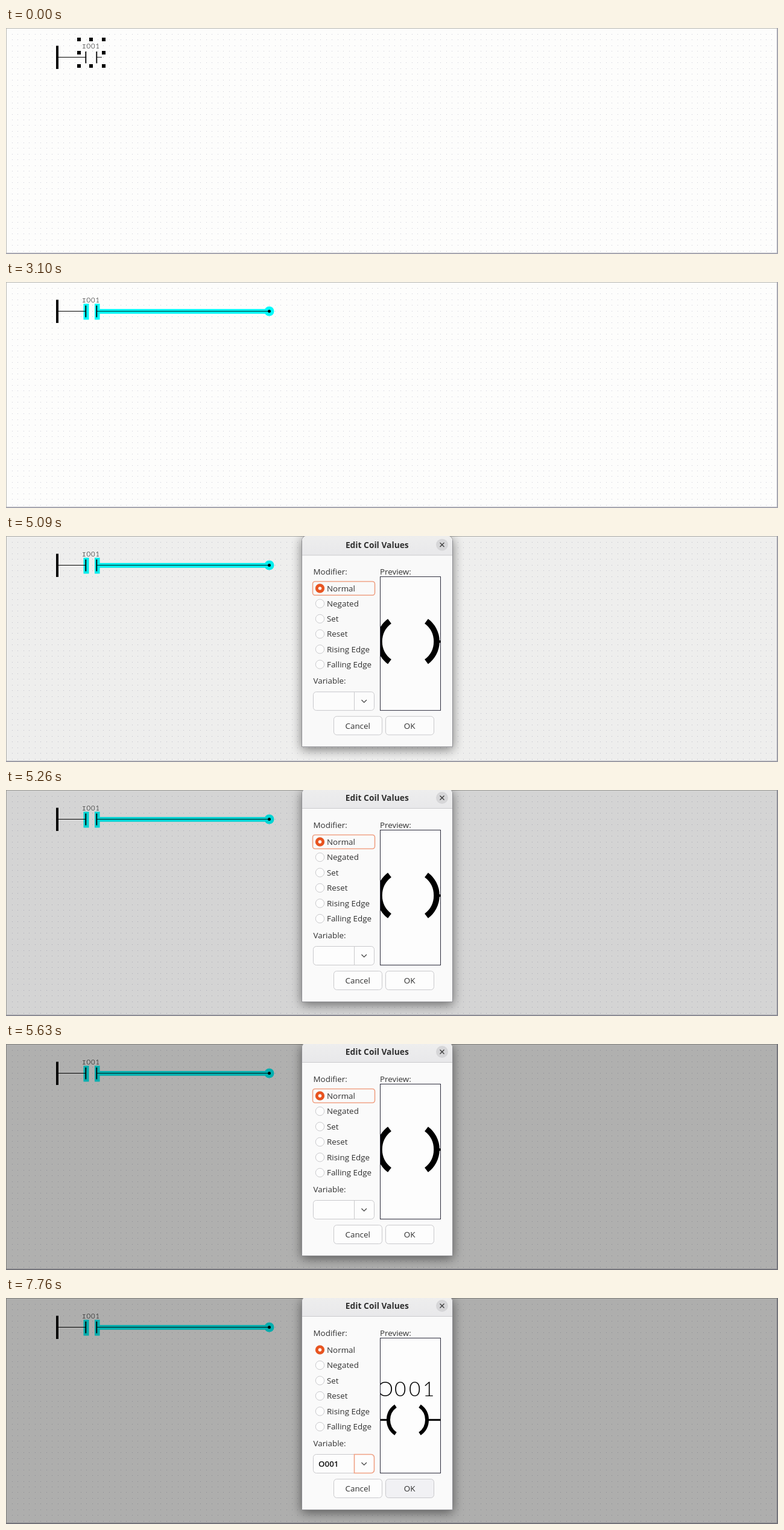
Recreate the animation shown at these times as an HTML page with a canvas. Size 1280x375 px, loop 8 s.

```html
<!DOCTYPE html>
<html lang="en">
<head>
<meta charset="utf-8">
<title>Ladder editor</title>
<style>
  html, body { margin: 0; width: 100%; height: 100%; overflow: hidden; background: #fdfdfc; }
  canvas, svg { position: absolute; left: 0; top: 0; width: 1280px; height: 375px; display: block; }
  text { font: 500 13.4px "Open Sans", "Noto Sans", sans-serif; fill: #303030; white-space: pre; }
  .title { font-size: 13.8px; font-weight: 700; }
  .mid { text-anchor: middle; }
  .thin { font-family: Lato, "Open Sans", sans-serif; font-weight: 300; fill: #000; }
  .mono { font-family: "Liberation Mono", monospace; fill: #666; }
  .value { font-weight: 600; fill: #111; }
  .box { fill: #fdfdfd; stroke: #c9c9cc; }
  .ring { fill: none; stroke: #f0a184; stroke-width: 1.6; }
  .ink { fill: none; stroke: #000; }
</style>
</head>
<body>
<canvas id="grid" width="1280" height="375"></canvas>
<svg id="stage" viewBox="0 0 1280 375">
  <defs>
    <linearGradient id="bar" x1="0" y1="0" x2="0" y2="1">
      <stop offset="0" stop-color="#eeeeee"/><stop offset="1" stop-color="#e8e8ea"/>
    </linearGradient>
    <filter id="shade" x="-20%" y="-20%" width="140%" height="140%">
      <feDropShadow dx="0" dy="4" stdDeviation="9" flood-opacity=".5"/>
    </filter>
    <filter id="soft" x="-10%" y="-10%" width="120%" height="120%">
      <feDropShadow dx="0" dy="1" stdDeviation="1.2" flood-opacity=".22"/>
    </filter>
    <clipPath id="pane"><rect x="621" y="67" width="99.5" height="223"/></clipPath>
  </defs>
</svg>
<script>
const LOOP = 8000, PITCH = 9.47, Y = 48.5;
const stage = document.getElementById('stage');

function add(parent, tag, attrs, text) {
  const el = document.createElementNS('http://www.w3.org/2000/svg', tag);
  for (const k in attrs) el.setAttribute(k, attrs[k]);
  if (text) el.textContent = text;
  parent.appendChild(el);
  return el;
}
const group = (p, attrs) => add(p, 'g', attrs || {});
const rect = (p, x, y, width, height, attrs) => add(p, 'rect', { x, y, width, height, ...attrs });
const path = (p, d, attrs) => add(p, 'path', { d, ...attrs });
const label = (p, x, y, text, cls) => add(p, 'text', { x, y, class: cls || '' }, text);
const show = (el, on) => el.setAttribute('display', on ? 'inline' : 'none');
const within = (t, a, b) => t >= a && t < b;
const clamp = v => Math.max(0, Math.min(1, v));

// Dot grid and sheet edges
const ctx = document.getElementById('grid').getContext('2d');
ctx.fillStyle = '#fdfdfc';
ctx.fillRect(0, 0, 1280, 375);
ctx.fillStyle = '#cbcbd6';
for (let i = 1; i < 135; i++)
  for (let j = 1; j < 40; j++)
    ctx.fillRect(Math.round(i * PITCH + .5), Math.round(j * PITCH + .5), 1, 1);
ctx.fillStyle = '#b6b6b0';
ctx.fillRect(0, 0, 1280, 1);
ctx.fillRect(0, 0, 1, 375);
ctx.fillStyle = '#a6a6b0';
ctx.fillRect(1278, 0, 2, 375);
ctx.fillRect(0, 373, 1280, 2);

// Diagram
const glow = group(stage, { fill: '#00fbfb' });
rect(glow, 128.5, 36, 9, 26.5);
rect(glow, 147, 36, 8.5, 26.5);
const glowWire = rect(glow, 155, 44.8, 1, 7.9);
const glowTip = add(glow, 'circle', { cy: Y, r: 8 });

rect(stage, 83, 29.5, 4, 38.5);
path(stage, `M87 ${Y}H132`, { class: 'ink' });
path(stage, 'M132.3 39V58.5M150.3 39V58.5', { class: 'ink', 'stroke-width': 1.8 });
const wire = path(stage, '', { class: 'ink', 'stroke-opacity': .85 });
const tip = add(stage, 'circle', { cy: Y, r: 2.5 });
const tag = add(stage, 'text', { y: 34, class: 'thin' });
tag.style.fontSize = '11.2px';
add(tag, 'tspan', { x: 126, class: 'mono' }, 'I');
add(tag, 'tspan', { x: '133.6 141 148.4' }, '001');

const handles = group(stage);
for (const x of [118, 138, 159])
  for (const y of [16, 38, 60])
    if (x !== 138 || y !== 38) rect(handles, x, y, 6, 6);

// Context menu
const ROW = 23.6;
const menu = group(stage);
rect(menu, 432.5, 50.5, 131.5, 150.5, { rx: 6, fill: '#fafaf9', stroke: '#92929c', filter: 'url(#soft)' });
const hover = rect(menu, 433, 0, 130.5, ROW, { fill: '#d9d9d9' });
['Block', 'Connection', 'Contact', 'Coil', 'Power Rail', 'Variable']
  .forEach((s, i) => label(menu, 462, 71.7 + i * ROW, s));

const dim = rect(stage, 0, 0, 1280, 375, { fill: '#000' });

// Dialog
const dialog = group(stage);
path(dialog, 'M490.5 351.5V6a8 8 0 0 1 8-8H732.5a8 8 0 0 1 8 8V351.5z',
  { fill: '#fafafa', stroke: '#8c8c90', filter: 'url(#shade)' });
path(dialog, 'M491 30.5V6a8 8 0 0 1 8-8H732a8 8 0 0 1 8 8V30.5z', { fill: 'url(#bar)' });
path(dialog, 'M491 30.5H740', { stroke: '#cbcbcd' });
label(dialog, 615.3, 18, 'Edit Coil Values', 'title mid');
add(dialog, 'circle', { cx: 723, cy: 13, r: 10, fill: '#d6d6d8' });
path(dialog, 'M719.5 9.5l7 7m0-7l-7 7', { stroke: '#3a3a3a', 'stroke-width': 1.4 });

label(dialog, 509.5, 63, 'Modifier:');
label(dialog, 620, 63, 'Preview:');
label(dialog, 509.5, 246, 'Variable:');
const focus = rect(dialog, 508.5, 74.5, 103, 23, { rx: 4, class: 'ring' });
['Normal', 'Negated', 'Set', 'Reset', 'Rising Edge', 'Falling Edge'].forEach((s, i) => {
  const cy = 86 + i * 25.5;
  add(dialog, 'circle', { cx: 520.5, cy, r: 7.2, class: 'box' });
  if (!i) {
    add(dialog, 'circle', { cx: 520.5, cy, r: 7.6, fill: '#e95420' });
    add(dialog, 'circle', { cx: 520.5, cy, r: 2.7, fill: '#fff' });
  }
  label(dialog, 532, cy + 4.9, s);
});

rect(dialog, 509.5, 259.5, 101, 31, { rx: 5, class: 'box' });
path(dialog, 'M577.5 260V290', { stroke: '#c9c9cc' });
const arrow = path(dialog, 'M577.5 259.5H605.5a5 5 0 0 1 5 5V285.5a5 5 0 0 1 -5 5H577.5z', { class: 'ring' });
path(dialog, 'M589.5 273l4.2 4.2l4.2 -4.2', { class: 'ink', style: 'stroke:#444;stroke-width:1.3' });
const value = label(dialog, 518, 280, 'O001', 'value');

// Preview pane
rect(dialog, 620.5, 66.5, 100, 224, { fill: '#fdfdfd', stroke: '#2c2c3c' });
const pane = group(dialog, { 'clip-path': 'url(#pane)' });
function coil(parent, x1, x2, y, half, r, width) {
  path(parent, `M${x1} ${y - half}A${r} ${r} 0 0 0 ${x1} ${y + half}M${x2} ${y - half}A${r} ${r} 0 0 1 ${x2} ${y + half}`,
    { class: 'ink', 'stroke-width': width });
}
const big = group(pane);
coil(big, 636, 697, 175, 34, 42.5, 9.6);
path(big, 'M718 175.3H721', { class: 'ink', 'stroke-width': 4 });
const named = group(pane);
coil(named, 646, 686, 202.3, 23, 28, 6);
path(named, 'M620 202.3H632M700 202.3H721', { class: 'ink', 'stroke-width': 3 });
const name = label(named, '615.5 644 668 691', 163.3, 'O001', 'thin');
name.style.fontSize = '33.5px';

function button(x, text) {
  const b = rect(dialog, x, 300.5, 80, 31, { rx: 5, class: 'box' });
  label(dialog, x + 39.7, 321, text, 'mid');
  return b;
}
button(543.5, 'Cancel');
const ok = button(629.5, 'OK');

const popup = group(dialog);
rect(popup, 509.5, 290.5, 101, 32, { fill: '#fcfcfc', stroke: '#c4c4c8' });
const pick = rect(popup, 510, 294, 100, 25, { fill: '#dedee0' });
label(popup, 518, 311.5, 'O001');

// [time, value] tables
const HOVER = [[3580, 0], [3650, 1], [3730, 2], [3800, 3], [4230, 2], [4530, 3]];
const DIM = [[4970, 0], [5090, .06], [5260, .16], [5450, .26], [5630, .305], [5730, .31], [6400, .315]];

function step(table, t) {
  let v = -1;
  for (const [at, x] of table) if (t >= at) v = x;
  return v;
}
function ramp(table, t) {
  let [t0, v0] = table[0];
  for (const [t1, v1] of table) {
    if (t < t1) return t1 === t0 ? v1 : v0 + (v1 - v0) * (t - t0) / (t1 - t0);
    [t0, v0] = [t1, v1];
  }
  return v0;
}

function draw(t) {
  show(handles, t < 820 || within(t, 1880, 2020) || within(t, 2180, 2580));

  const live = t >= 2580;
  const p = clamp((Math.floor((t - 2580) / 40) + 1) / 14);
  const end = t >= 3100 ? 436.5 : 159 + 277.5 * p * p * (3 - 2 * p);
  show(glow, live);
  show(tip, live);
  wire.setAttribute('d', `M150 ${Y}H${live ? end : 159}`);
  glowWire.setAttribute('width', Math.max(0, end - 155));
  glowTip.setAttribute('cx', end);
  tip.setAttribute('cx', end);

  show(menu, within(t, 3290, 4930));
  menu.setAttribute('opacity', t < 3320 ? .5 : 1);
  const row = step(HOVER, t);
  show(hover, row >= 0);
  hover.setAttribute('y', 55.2 + row * ROW);

  dim.setAttribute('opacity', ramp(DIM, t));

  const q = clamp((t - 5000) / 101);
  const s = 1 - (1 - q) * (1 - q);
  show(dialog, q > 0);
  dialog.setAttribute('opacity', s);
  dialog.setAttribute('transform', `translate(0 ${175 * (1 - s)}) scale(1 ${s})`);

  show(focus, t < 6580);
  show(arrow, t >= 6580);
  show(popup, within(t, 6580, 7500));
  popup.setAttribute('opacity', clamp((t - 6550) / 120));
  show(pick, t >= 7390);
  show(value, t >= 7500);
  show(big, t < 7560);
  show(named, t >= 7560);
  ok.style.fill = t >= 7720 ? '#f1f1f4' : '';
}

const start = performance.now();
function tick() {
  draw((performance.now() - start) % LOOP);
  requestAnimationFrame(tick);
}
tick();
</script>
</body>
</html>
```
